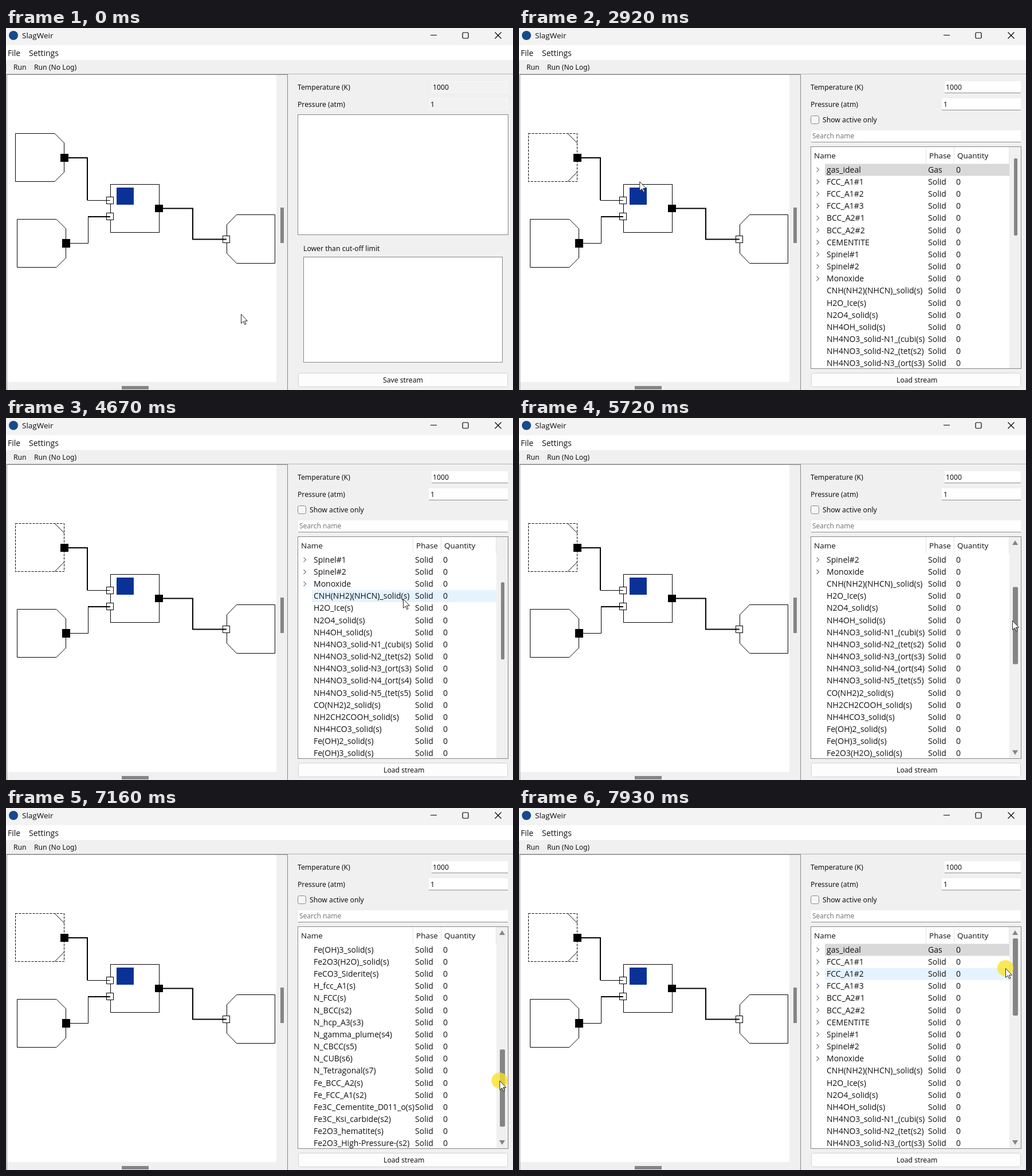
Animation of 885x633 px, one loop 8000 ms. Source, as an HTML page:

```html
<!DOCTYPE html>
<html lang="en">
<head>
<meta charset="utf-8">
<title>SlagWeir</title>
<style>
  html, body { margin: 0; width: 100%; height: 100%; overflow: hidden; background: #f0f0f0; }
  svg { display: block; width: 885px; height: 633px; }
  text { font: 12.2px "Noto Sans", sans-serif; fill: #111; white-space: pre; }
  .ui { font: 14px "Open Sans", sans-serif; }
  .head { font-size: 13.5px; }
  .hint { font-size: 12px; fill: #777; }
  .line { fill: none; stroke: #000; }
  .port { fill: #fff; stroke: #000; }
  .frame { fill: #fff; stroke: #868686; }
  .thumb { fill: #858585; }
  .off { fill: #f2f2f2; stroke: #f8f8f8; }
  .button { fill: #fdfdfd; stroke: #d2d2d2; }
</style>
</head>
<body>
<svg viewBox="0 0 885 633">
  <defs>
    <clipPath id="listClip"><rect x="510" y="237" width="346" height="358"/></clipPath>
  </defs>

  <!-- window chrome -->
  <rect width="885" height="633" fill="#f0f0f0"/>
  <rect width="885" height="30" fill="#f3f3f3"/>
  <rect y="30" width="885" height="26" fill="#fff"/>
  <circle cx="13" cy="13" r="8" fill="#164a8c"/>
  <text class="ui" style="font-size:13.5px" x="28" y="18">SlagWeir</text>
  <path class="line" d="M741 12.5h11M853.500 7.500l11 11m0-11l-11 11" stroke-width="1.2"/>
  <rect class="line" x="797" y="8" width="10" height="10" rx="1.500" stroke-width="1.2"/>
  <text class="ui" x="3" y="49">File</text>
  <text class="ui" x="40" y="49">Settings</text>
  <path d="M.5 60v18" stroke="#aaa" stroke-dasharray="1 2"/>
  <text x="13" y="73">Run</text>
  <text x="49" y="73">Run (No Log)</text>
  <path d="M0 80.500h885" stroke="#b4b4b4"/>

  <!-- diagram view -->
  <rect x="1.500" y="81.500" width="490" height="560" fill="#f0f0f0" stroke="#868686"/>
  <rect x="2" y="82" width="470" height="537" fill="#fff"/>
  <rect class="thumb" x="479" y="314" width="6" height="62"/>
  <rect class="thumb" x="202" y="626" width="47" height="6"/>
  <path id="plainNode" class="line" d="M16.500 184.500H85L101.500 201V252L85 268.500H16.500Z"/>
  <g id="pickedNode" class="line">
    <rect x="16.500" y="184.500" width="85" height="84" stroke-dasharray="4 2"/>
    <path d="M85 184.500L101.500 201M101.500 252L85 268.500"/>
  </g>
  <path class="line" d="M19.500 334.500H88L104.500 351V402L88 418.500H19.500Z"/>
  <path class="line" d="M385.500 344L402.500 326.500H469.500V411.500H402.500L385.500 394Z"/>
  <rect class="line" x="182.500" y="273.500" width="85" height="84"/>
  <rect x="193" y="279" width="30" height="30" fill="#0a3296"/>
  <rect class="port" x="175.500" y="295.500" width="12" height="12"/>
  <rect class="port" x="175.500" y="323.500" width="12" height="12"/>
  <rect class="port" x="378.500" y="363.500" width="12" height="12"/>
  <path class="line" stroke-width="2" d="M108 227H142V301M144 330H182M274 315.500H326V369.500H385"/>
  <path class="line" d="M142 301.500H182M112 376.500H143.500V329"/>
  <path d="M95 220h14v14h-14zM98 369h14v15h-14zM260 309h14v13h-14z"/>

  <!-- stream properties -->
  <text x="509" y="108">Temperature (K)</text>
  <text x="509" y="138">Pressure (atm)</text>

  <g id="resultPanel">
    <rect class="off" x="743.500" y="93.500" width="132" height="19"/>
    <rect class="off" x="738.500" y="123.500" width="137" height="19"/>
    <rect class="frame" x="509.500" y="151.500" width="367" height="210"/>
    <text x="519" y="390">Lower than cut-off limit</text>
    <rect class="frame" x="519.500" y="400.500" width="347" height="184"/>
    <rect class="button" x="510.500" y="603.500" width="365" height="24" rx="3"/>
    <text x="658" y="620">Save stream</text>
  </g>

  <g id="inputPanel">
    <path fill="#fff" d="M743 93h133v20h-133zM738 123h138v20h-138zM510 179h366v20h-366z"/>
    <path stroke="#8c8c8c" d="M743 113.500h133M738 143.500h138M510 199.500h366"/>
    <rect x="509.500" y="153.500" width="14" height="14" rx="3" fill="#f6f6f6" stroke="#858585"/>
    <text x="530" y="165">Show active only</text>
    <text class="hint" x="512" y="193">Search name</text>
    <rect class="frame" x="509.500" y="207.500" width="367" height="388"/>
    <rect x="856" y="208" width="20" height="387" fill="#f0f0f0"/>
    <path stroke="#e3e3e3" d="M710.500 208v29M759.500 208v29M855.500 208v29"/>
    <text class="ui head" x="515" y="228">Name</text>
    <text class="ui head" x="716" y="228">Phase</text>
    <text class="ui head" x="765" y="228">Quantity</text>
    <g clip-path="url(#listClip)">
      <rect id="picked" x="534" width="322" height="21" fill="#d9d9d9"/>
      <rect id="hover" x="534" width="322" height="21" fill="#e5f3ff"/>
      <g id="rows"></g>
    </g>
    <path id="arrows" class="thumb" d="M861 222l5-8 5 8zM861 581l5 8 5-8z"/>
    <rect id="thumb" class="thumb" height="135" rx="2"/>
    <rect class="button" x="510.500" y="603.500" width="365" height="24" rx="3"/>
    <text x="659" y="620">Load stream</text>
  </g>
  <text x="745" y="108">1000</text>
  <text x="741" y="138">1</text>

  <g id="cursor">
    <circle id="press" r="14" fill="#fae128" fill-opacity=".78"/>
    <path d="M.5 .5V16.500L4.300 13L6.800 18.700L9 17.700L6.500 12.200H11.500Z" fill="#fff" stroke="#222"/>
  </g>
</svg>

<script>
const LOOP = 8000, STEP = 70;
const ROW = 21.16, LIST_TOP = 237.5, SLOTS = 17, MAX_SCROLL = 25;
const THUMB_TOP = 228, THUMB_ROW = 8.45;
const names = `gas_ideal FCC_A1#1 FCC_A1#2 FCC_A1#3 BCC_A2#1 BCC_A2#2 CEMENTITE Spinel#1 Spinel#2 Monoxide
  CNH(NH2)(NHCN)_solid(s) H2O_Ice(s) N2O4_solid(s) NH4OH_solid(s)
  NH4NO3_solid-N1_(cubi(s) NH4NO3_solid-N2_(tet(s2) NH4NO3_solid-N3_(ort(s3)
  NH4NO3_solid-N4_(ort(s4) NH4NO3_solid-N5_(tet(s5)
  CO(NH2)2_solid(s) NH2CH2COOH_solid(s) NH4HCO3_solid(s) Fe(OH)2_solid(s) Fe(OH)3_solid(s)
  Fe2O3(H2O)_solid(s) FeCO3_Siderite(s) H_fcc_A1(s) N_FCC(s) N_BCC(s2) N_hcp_A3(s3)
  N_gamma_plume(s4) N_CBCC(s5) N_CUB(s6) N_Tetragonal(s7) Fe_BCC_A2(s) Fe_FCC_A1(s2)
  Fe3C_Cementite_D011_o(s) Fe3C_Ksi_carbide(s2) Fe2O3_hematite(s)
  Fe2O3_High-Pressure-(s2) Fe2O3_High-Pressure-(s3)`.split(/\s+/);
const EXPANDABLE = 10;

// start time, steps, target x, target y, eased
const moves = [
  [870, 12, 56, 259, true],
  [1710, 2, 55, 257],
  [2710, 12, 676, 302, true],
  [3550, 5, 693, 315],
  [4400, 1, 693, 316],
  [4950, 7, 790, 335],
  [5440, 5, 861, 354],
  [5920, 9, 865, 493],
  [6550, 3, 866, 530],
  [6760, 1, 870, 534],
  [7020, 7, 850, 400],
  [7510, 5, 850, 290],
  [7860, 2, 849, 280],
];

const $ = id => document.getElementById(id);
const clamp = (v, lo, hi) => Math.min(hi, Math.max(lo, v));
const show = (id, on) => $(id).setAttribute('visibility', on ? 'inherit' : 'hidden');
const stepsSince = (t, start, count) => clamp(Math.floor((t - start) / STEP) + 1, 0, count);

function add(tag, attrs, parent) {
  const el = document.createElementNS('http://www.w3.org/2000/svg', tag);
  for (const key in attrs) el.setAttribute(key, attrs[key]);
  return parent.appendChild(el);
}

const slots = Array.from({ length: SLOTS }, (_, i) => {
  const y = LIST_TOP + i * ROW + 15.3;
  const cell = x => add('text', { class: 'ui', x, y }, $('rows'));
  const arrow = add('path', {
    d: `M519.5 ${y - 9}l4 4l-4 4`, fill: 'none', stroke: '#777', 'stroke-width': 1.2
  }, $('rows'));
  const slot = { name: cell(537), phase: cell(714), arrow };
  cell(763).textContent = '0';
  return slot;
});

function cursorAt(t) {
  let x = 410, y = 500;
  for (const [start, count, toX, toY, eased] of moves) {
    if (t < start) break;
    let p = stepsSince(t, start, count) / count;
    if (eased) p = (1 - Math.cos(Math.PI * p)) / 2;
    x += (toX - x) * p;
    y += (toY - y) * p;
  }
  return { x, y };
}

function scrollAt(t, y) {
  if (t < 5920) return stepsSince(t, 3980, 5) + stepsSince(t, 4600, 3);
  const grip = t < 7020 ? 61 : 54;
  return clamp(Math.round((y - grip - THUMB_TOP) / THUMB_ROW), 0, MAX_SCROLL);
}

function placeRow(id, slot, on) {
  show(id, on);
  $(id).setAttribute('y', LIST_TOP + slot * ROW);
}

let shownScroll = -1;
function fillRows(scroll) {
  if (scroll === shownScroll) return;
  shownScroll = scroll;
  slots.forEach((slot, i) => {
    const row = scroll + i, exists = row < names.length;
    slot.name.textContent = exists ? names[row] : '';
    slot.phase.textContent = exists ? (row ? 'Solid' : 'Gas') : '';
    slot.arrow.setAttribute('visibility', row < EXPANDABLE ? 'inherit' : 'hidden');
  });
}

function render(t) {
  const { x, y } = cursorAt(t);
  const open = t >= 1980, dragging = t >= 5920;
  const scroll = scrollAt(t, y), onBar = t >= 5440;
  show('plainNode', !open);
  show('pickedNode', open);
  show('resultPanel', !open);
  show('inputPanel', open);
  show('press', dragging || (open && t < 2110));
  show('arrows', onBar && open);
  $('cursor').setAttribute('transform', `translate(${x} ${y})`);
  if (!open) {
    show('picked', false);
    show('hover', false);
    return;
  }

  fillRows(scroll);
  const hoverSlot = Math.floor((y + (dragging ? 8 : 0) - LIST_TOP) / ROW);
  const inList = x > 510 && x < 856 && hoverSlot >= 0 && hoverSlot < SLOTS;
  placeRow('picked', 0, scroll === 0);
  placeRow('hover', hoverSlot, inList && hoverSlot + scroll > 0);
  const thumb = $('thumb');
  thumb.setAttribute('x', onBar ? 862 : 864);
  thumb.setAttribute('width', onBar ? 9 : 6);
  thumb.setAttribute('y', THUMB_TOP + scroll * THUMB_ROW);
}

const begin = performance.now();
function tick() {
  render((performance.now() - begin) % LOOP);
  requestAnimationFrame(tick);
}
tick();
</script>
</body>
</html>
```
